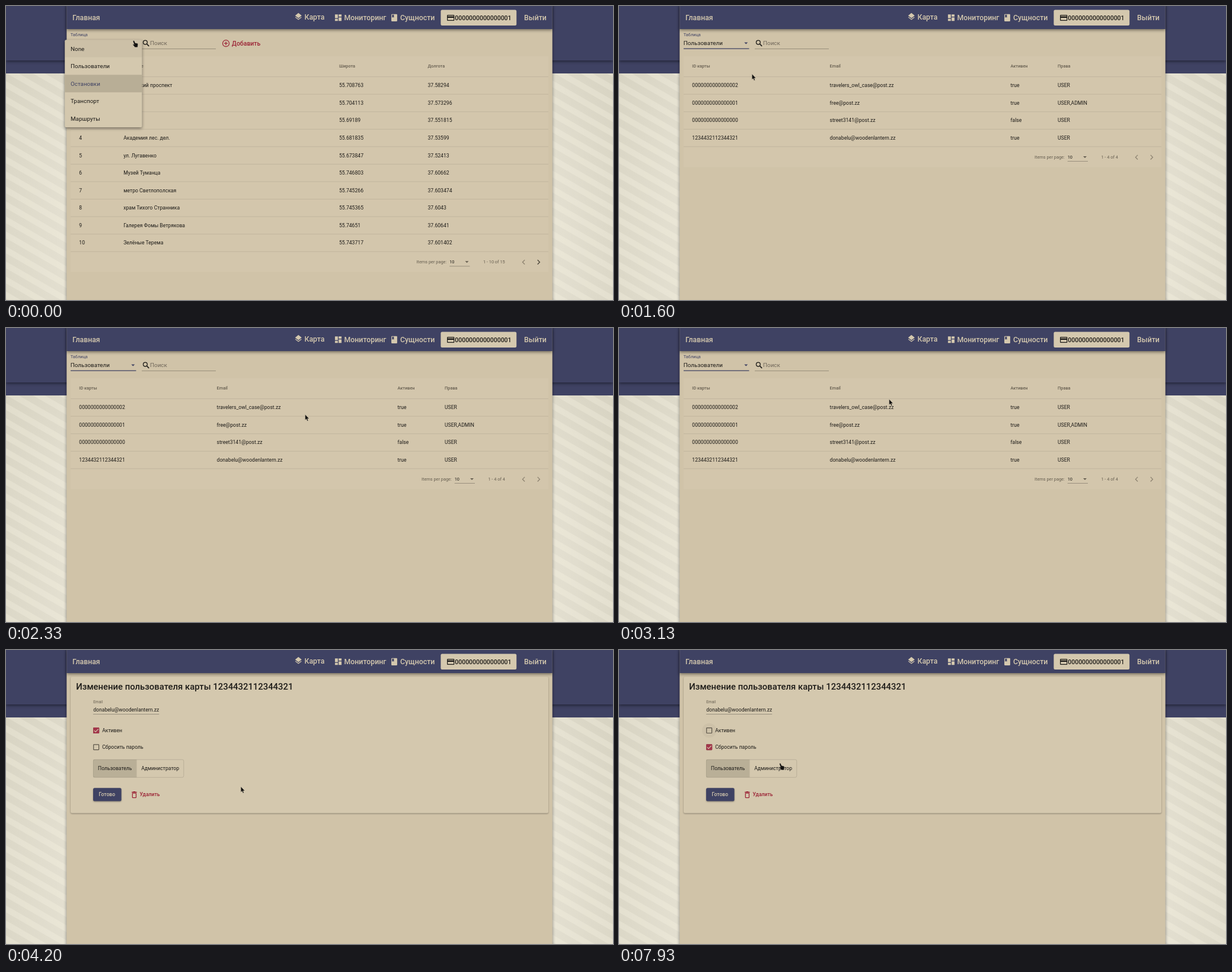
Animation, 1024 px wide and 497 px high, one loop 8000 ms. Source, as an HTML page:

```html
<!DOCTYPE html>
<html lang="ru">
<head>
<meta charset="utf-8">
<style>
html, body { margin: 0; width: 100%; height: 100%; overflow: hidden; background: #d0c3a8; }
svg { display: block; width: 100vw; height: 100vh; }
text { font-family: Roboto, sans-serif; white-space: pre; }
.low { filter: drop-shadow(0 1px 1px rgba(0,0,0,.35)); }
.high { filter: drop-shadow(0 2px 2.5px rgba(0,0,0,.45)); }
</style>
</head>
<body>
<svg id="stage" viewBox="0 0 1024 497" preserveAspectRatio="none"></svg>
<script>
const NAVY = '#3f4263', SAND = '#d4c8ae', INK = '#1d1b18', GREY = '#665e50', RED = '#9b2335', ACCENT = '#a3364a';
const ROW = 29.56, BODY = 8.62, SMALL = 7.39, FIELD = 9.86, NAV = 12.3, BUTTON = 10.48;

// Text is placed by the vertical middle of its capitals.
const text = (x, mid, str, size = BODY, fill = INK, weight = 400, extra = '') =>
  `<text x="${x}" y="${mid + size * 0.355}" font-size="${size}" fill="${fill}" font-weight="${weight}" ${extra}>${str}</text>`;
const rect = (x, y, w, h, fill, extra = '') =>
  `<rect x="${x}" y="${y}" width="${w}" height="${h}" fill="${fill}" ${extra}/>`;
const line = (x1, x2, y, color = '#00000066', width = 0.7) =>
  `<path d="M${x1} ${y}H${x2}" stroke="${color}" stroke-width="${width}"/>`;
const icon = (cx, cy, d, fill) =>
  `<path transform="translate(${cx - 7.4} ${cy - 7.4}) scale(.616)" d="${d}" fill="${fill}" fill-rule="evenodd"/>`;
const caret = (x, y, fill) => `<path d="M${x - 3} ${y - 1.4}h6l-3 3z" fill="${fill}"/>`;
const chevron = (x, y, dir, fill) =>
  `<path d="M${x - dir * 1.6} ${y - 3.8}l${dir * 3.7} 3.8l${-dir * 3.7} 3.8" fill="none" stroke="${fill}" stroke-width="1.3"/>`;
const group = (id, body, extra = '') => `<g id="${id}" ${extra}>${body}</g>`;

const ICONS = {
  layers: 'M11.99 18.54l-7.37-5.73L3 14.07l9 7 9-7-1.63-1.27zM12 16l7.36-5.73L21 9l-9-7-9 7 1.63 1.27z',
  dashboard: 'M3 13h8V3H3zM3 21h8v-6H3zM13 21h8V11h-8zM13 3v6h8V3z',
  book: 'M18 2H6Q4 2 4 4v16q0 2 2 2h12q2 0 2-2V4q0-2-2-2zM6 4h5v8l-2.5-1.5L6 12z',
  card: 'M20 4H4Q2 4 2 6v12q0 2 2 2h16q2 0 2-2V6q0-2-2-2zM20 18H4v-6h16zM20 8H4V6h16z',
  trash: 'M6 19q0 2 2 2h8q2 0 2-2V7H6zM8 9h8v10H8zM15.5 4l-1-1h-5l-1 1H5v2h14V4z'
};

function backdrop() {
  return `<defs>
    <radialGradient id="paper" gradientUnits="userSpaceOnUse" cx="512" cy="390" r="640">
      <stop offset=".55" stop-color="#e8e4d6"/><stop offset="1" stop-color="#d3cfbd"/></radialGradient>
    <pattern id="stripes" width="22" height="22" patternUnits="userSpaceOnUse" patternTransform="rotate(30)">
      <rect width="22" height="10" fill="#fffbea" opacity=".24"/></pattern>
    <clipPath id="inputClip"><rect x="147" y="90" width="111.3" height="18"/></clipPath></defs>` +
    rect(0, 0, 1024, 497, 'url(#paper)') + rect(0, 114, 1024, 383, 'url(#stripes)') +
    rect(0, 90, 1024, 24, NAVY) + rect(0, 0, 1024, 92, NAVY, 'class="high"') +
    rect(102.3, 0, 819.4, 510, '#d0c3a8', 'class="high"');
}

function header() {
  const item = (x, y, s) => text(x, y, s, NAV, SAND, 500);
  return rect(102.3, -6, 819.4, 45, NAVY, 'class="high"') +
    item(112, 19.3, 'Главная') +
    icon(493.3, 18, ICONS.layers, SAND) + item(503.5, 18.3, 'Карта') +
    icon(560.5, 19.8, ICONS.dashboard, SAND) + item(570.5, 19.8, 'Мониторинг') +
    icon(655, 19.8, ICONS.book, SAND) + item(665, 19.8, 'Сущности') +
    rect(733.4, 6.6, 127.8, 26.4, SAND, 'rx="2.5"') +
    icon(750.2, 20, ICONS.card, INK) + text(757.3, 20, '0000000000000001', BUTTON, INK, 500) +
    item(874, 19.8, 'Выйти');
}

function toolbar() {
  return text(108.8, 48.3, 'Таблица', SMALL, NAVY, 400, 'id="selectLabel"') +
    text(108.8, 62.8, 'Остановки', FIELD, INK, 400, 'id="selectValue"') +
    `<g id="focused">${caret(214.3, 63, NAVY)}${line(109, 219.5, 72.2, NAVY, 1.3)}</g>` +
    `<g id="blurred">${caret(214.3, 63, GREY)}${line(109, 219.5, 72.4)}</g>` +
    `<g fill="none" stroke="${INK}"><circle cx="234.9" cy="61.6" r="3.4" stroke-width="1.3"/>
     <path d="M237.3 64l3.9 3.9" stroke-width="1.7"/></g>` +
    text(243, 62.8, 'Поиск', FIELD, '#70675a') + line(229, 354, 72.4);
}

function table(columns, heads, rows, range, pagerX, hasNext) {
  const bottom = 119.6 + rows.length * ROW, mid = bottom + 17.5;
  let out = rect(109, 85, 806, bottom + 34.5 - 85, '#d3c6ac');
  heads.forEach((h, i) => out += text(columns[i], 101.8, h, SMALL, GREY, 500));
  rows.forEach((cells, r) => {
    out += line(109, 915, 119.6 + r * ROW, '#00000022');
    cells.forEach((c, i) => out += text(columns[i], 134.2 + r * ROW, c));
  });
  return out + line(109, 915, bottom, '#00000022') +
    text(pagerX, mid, 'Items per page:', SMALL, GREY) + text(pagerX + 55.7, mid, '10', SMALL) +
    caret(pagerX + 85, mid, GREY) + line(pagerX + 55.7, pagerX + 90, mid + 7.2) +
    text(pagerX + 112.4, mid, range, SMALL, GREY) +
    chevron(873.5, mid + .3, -1, '#8d8371') + chevron(898.3, mid + .3, 1, hasNext ? '#4a443a' : '#8d8371');
}

const stops = [
  ['Луговский проспект', '55.708763', '37.58294'],
  ['Парк', '55.704113', '37.573296'],
  ['ЦК ЛАУ', '55.69189', '37.551815'],
  ['Академия лес. дел.', '55.681835', '37.53599'],
  ['ул. Лугавенко', '55.673847', '37.52413'],
  ['Музей Туманца', '55.746803', '37.60662'],
  ['метро Светлополская', '55.745266', '37.603474'],
  ['храм Тихого Странника', '55.745365', '37.6043'],
  ['Галерея Фомы Ветрякова', '55.74651', '37.60641'],
  ['Зелёные Терема', '55.743717', '37.601402']
].map((row, i) => [i + 1, ...row]);
const EMAIL = 'donabelu@woodenlantern.zz';
const users = [
  ['0000000000000002', 'travelers_owl_case@post.zz', 'true', 'USER'],
  ['0000000000000001', 'free@post.zz', 'true', 'USER,ADMIN'],
  ['0000000000000000', 'street3141@post.zz', 'false', 'USER'],
  ['1234432112344321', EMAIL, 'true', 'USER']
];

function stopsView() {
  return table([123.3, 198.2, 562, 711.5], ['ID', 'Название', 'Широта', 'Долгота'], stops, '1 - 10 of 15', 692.5, true) +
    `<g fill="none" stroke="${RED}" stroke-width="1.2"><circle cx="371" cy="63.2" r="5.5"/>
     <path d="M368 63.2h6M371 60.2v6"/></g>` + text(381, 63, 'Добавить', BUTTON, RED, 500);
}

function menu() {
  const items = ['None', 'Пользователи', 'Остановки', 'Транспорт', 'Маршруты'];
  return rect(99.2, 57.2, 130.2, 147.8, SAND, 'class="high" rx="2"') +
    rect(99.2, 57.2, 130.2, ROW, '#0000000a', 'id="hover"') +
    rect(99.2, 57.2 + ROW * 2, 130.2, ROW, '#b8ae96') +
    items.map((s, i) => text(109, 72 + i * ROW, s, FIELD, i === 2 ? NAVY : INK)).join('');
}

function checkbox(id, mid, label) {
  return `<circle id="${id}Ripple" cx="152.2" cy="${mid}"/>` +
    rect(147.7, mid - 4.4, 8.9, 8.9, 'none', `rx=".7" stroke="#5c5549" stroke-width="1.2"`) +
    group(id, rect(147.1, mid - 5, 10.1, 10.1, ACCENT, 'rx="1.2"') +
      `<path d="M148.8 ${mid + .2}l2.3 2.3l4.6-4.8" fill="none" stroke="${SAND}" stroke-width="1.2"/>`) +
    text(162.2, mid, label);
}

function form() {
  return rect(109, 45, 806, 230.8, SAND, 'class="low" rx="2.5"') +
    text(118.3, 62.2, 'Изменение пользователя карты 1234432112344321', 14.85, INK, 500) +
    text(147.2, 88, 'Email', 6.47, GREY) +
    `<g clip-path="url(#inputClip)">${text(147.2, 100.5, EMAIL)}</g>` + line(147, 258.3, 108.6) +
    checkbox('active', 136, 'Активен') + checkbox('reset', 164.2, 'Сбросить пароль') +
    rect(147.3, 185.3, 73.2, 30, '#b9af97') +
    rect(147.3, 185.3, 152.5, 30, 'none', 'rx="2.5" stroke="#00000026" stroke-width=".8"') +
    text(155, 200.3, 'Пользователь') + text(228.2, 200.3, 'Администратор') +
    rect(147, 233.2, 47.6, 22.2, NAVY, 'class="low" rx="2.5"') + text(156.4, 244.2, 'Готово', BODY, SAND, 500) +
    icon(216.4, 244.6, ICONS.trash, RED) + text(225.5, 244.2, 'Удалить', BODY, RED, 500);
}

const cursor = `<g id="cursor" fill="#12110f" stroke="#d8ceb8" stroke-width=".4">
  <path id="arrow" d="M0 0V9.3L2.1 7.4 3.6 10.9 5.1 10.2 3.7 6.9H6.6z"/>
  <path id="hand" d="M.8.2Q2-.4 2.6.8L4 4 7.3 4.6Q8.9 5 8.6 6.6L8 11.2H3.5L.2 7.3Q-.4 6.2.7 5.9L2.2 6.8.4 1.4Q.1.6.8.2z"/></g>`;

const stage = document.getElementById('stage');
stage.innerHTML = backdrop() +
  group('lists', toolbar() + group('stops', stopsView()) +
    group('users', table([123.3, 355.6, 660.5, 740], ['ID карты', 'Email', 'Активен', 'Права'], users, '1 - 4 of 4', 701, false))) +
  group('form', form()) + header() + group('menu', menu()) + cursor;

const el = Object.fromEntries([...stage.querySelectorAll('[id]')].map(n => [n.id, n]));
const show = (node, on) => node.style.display = on ? '' : 'none';
const ramp = (t, a, b) => Math.min(1, Math.max(0, (t - a) / (b - a)));

// Pointer path: time, x, y
const path = [
  [0, 214, 58.5], [333, 196, 97], [1533, 196, 97], [1600, 224.3, 115], [2133, 458.5, 225.5],
  [2400, 520, 120], [2667, 462, 52], [3000, 462, 52], [3133, 455.8, 120.3], [3333, 420, 238],
  [3400, 420, 238], [3667, 396.2, 231], [4467, 396.2, 231], [4800, 320, 350], [5067, 252, 167],
  [5333, 252, 167], [5667, 196.2, 145], [6333, 196.2, 145], [6533, 202, 160], [7200, 202, 160],
  [7400, 199, 132], [7800, 199, 132], [7933, 270.4, 191.6], [8000, 270.4, 191.6]
];

function pointer(t) {
  const i = Math.max(1, path.findIndex(p => p[0] >= t));
  const [a, b] = [path[i - 1], path[i]], k = ramp(t, a[0], b[0]);
  return [a[1] + (b[1] - a[1]) * k, a[2] + (b[2] - a[2]) * k];
}

function ripple(node, t, start, color, rest) {
  node.setAttribute('r', 12.2 * Math.sqrt(ramp(t, start - 67, start + 200)));
  node.setAttribute('fill', color);
  node.setAttribute('opacity', 0.16 + (rest - 0.16) * ramp(t, start + 150, start + 430));
}

function render(now) {
  const t = Math.floor((now % 8000 + 4) * 0.015) / 0.015 + 0.1;
  const [x, y] = pointer(t);
  const onMenu = t < 1066, onForm = t >= 4200, blurred = t >= 4000;
  const hand = onMenu || (t > 6450 && t < 7250) || t > 7330;

  show(el.lists, !onForm);
  show(el.form, onForm);
  show(el.stops, t < 1200);
  show(el.users, t >= 1200);
  el.selectValue.textContent = t < 933 ? 'Остановки' : 'Пользователи';
  el.selectLabel.setAttribute('fill', blurred ? GREY : NAVY);
  show(el.focused, !blurred);
  show(el.blurred, blurred);

  el.menu.style.opacity = 1 - ramp(t, 1000, 1133);
  el.hover.setAttribute('y', 57.2 + (y > 82 ? ROW : 0));
  el.hover.setAttribute('fill', t < 933 ? '#0000000a' : '#0000001c');

  el.reset.style.opacity = ramp(t, 6950, 7130);
  el.active.style.opacity = 1 - ramp(t, 7450, 7600);
  ripple(el.resetRipple, t, 7000, ACCENT, 0);
  ripple(el.activeRipple, t, 7467, '#000', 0.03);

  el.cursor.setAttribute('transform', `translate(${x} ${y})`);
  show(el.hand, hand);
  show(el.arrow, !hand);
}

function tick() {
  render(performance.now());
  requestAnimationFrame(tick);
}
tick();
</script>
</body>
</html>
```
